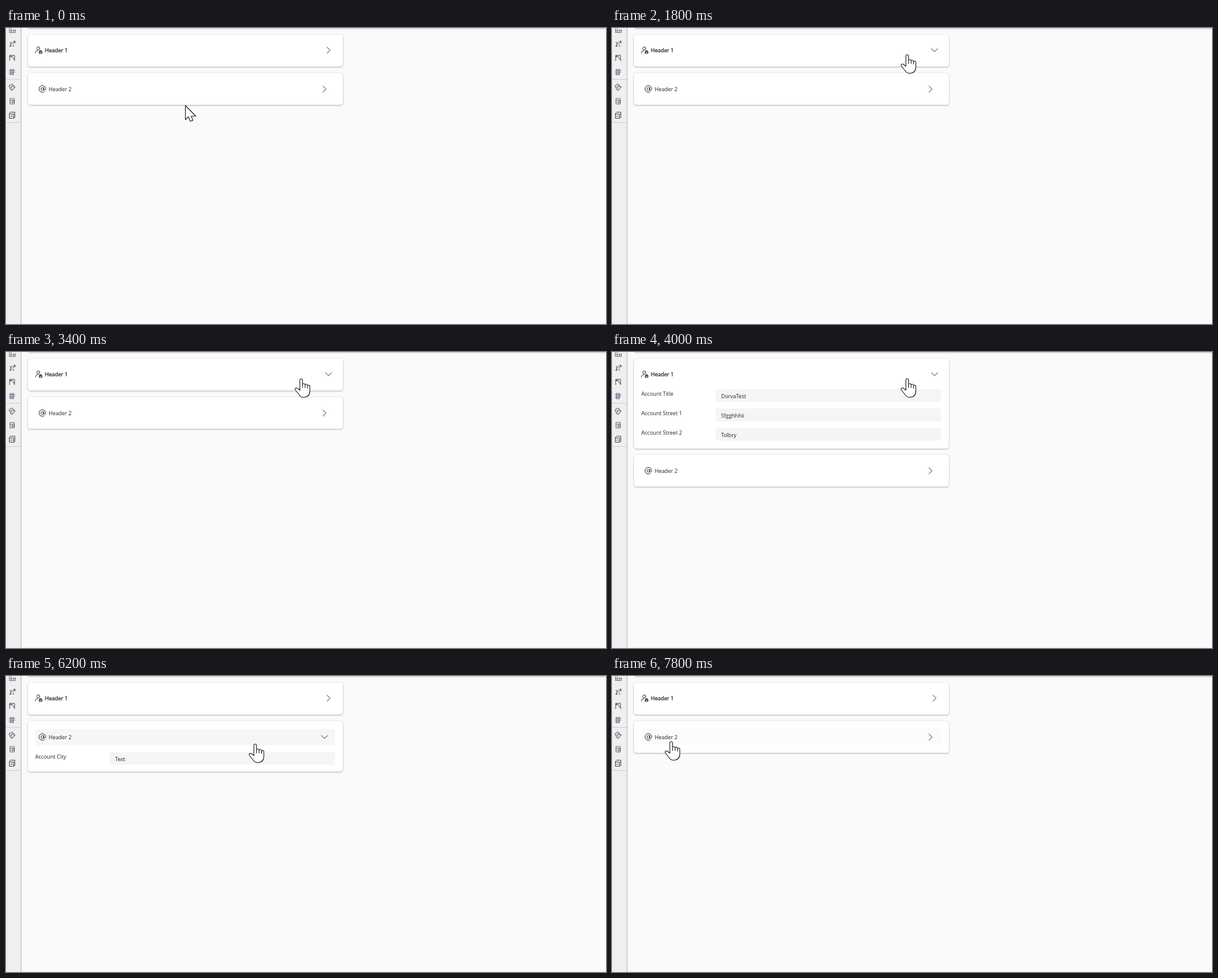
Recreate the animation shown at these times as an HTML page. Size 985x487 px, loop 8 s.

```html
<!DOCTYPE html>
<html lang="en">
<head>
<meta charset="utf-8">
<title>Collapsible cards</title>
<style>
  html, body { margin: 0; width: 100%; height: 100%; overflow: hidden; background: #fafafa; }
  svg { display: block; width: 100vw; height: 100vh; }
  text { font: 8.8px "Open Sans", "Noto Sans", sans-serif; fill: #242424; }
  .head { fill: #111; stroke: #111; stroke-width: .2; }
  .card { fill: #fff; filter: drop-shadow(0 1px 1.2px rgba(0,0,0,.24)) drop-shadow(0 0 .8px rgba(0,0,0,.12)); }
  .line { fill: none; stroke: #2a2a2a; stroke-linecap: round; stroke-linejoin: round; }
  .side { fill: none; stroke: #444; }
  .cursor { fill: #fff; stroke: #1c1c1c; stroke-width: 1.1; stroke-linejoin: round; }
</style>
</head>
<body>
<svg viewBox="0 0 985 487">
  <defs>
    <linearGradient id="top" x2="0" y2="1">
      <stop stop-color="#c4c4c4"/><stop offset="1" stop-color="#fafafa"/>
    </linearGradient>
    <linearGradient id="edge">
      <stop stop-color="#b9b9b9"/><stop offset="1" stop-color="#fafafa"/>
    </linearGradient>
  </defs>
  <rect width="985" height="487" fill="#fafafa"/>
  <rect x="37" width="948" height="3" fill="url(#top)"/>
  <rect y="486" width="985" height="1" fill="#f0f0f0"/>

  <rect width="24" height="487" fill="#efefef"/>
  <rect x="24" width="2.5" height="487" fill="url(#edge)"/>
  <path d="M0 84.5H24M0 155.5H24" stroke="#cfcfcf"/>
  <g class="side">
    <path d="M5.5 0V7.500H15.500V2M5.500 4.500H15M8.500 0V7M12.500 2V7" stroke="#777"/>
    <path d="M6 23L8 25L11 23M8 25V31M8 27L6 31M11 27L15 21M12 22H15V25M12 28V31"/>
    <path d="M6 54V45H14V54M6 47H10L14 53M8 45V48"/>
    <path d="M5 69.500H15M5 72.500H15M5 75.500H13M8 67V78M11.500 67V78" stroke="#557"/>
    <path d="M5 95L10 92L15 97L11 102H8ZM8 97L11 95L13 98M8 97L10 100"/>
    <path d="M6.500 116H13.500V125H6.500ZM6 119H15M8 122H15M11 119V124" stroke="#666"/>
    <path d="M7.500 138.500H14.500V147L13 148.500H5.500V140.500ZM5.500 141.500H12.500V148M7 145H11"/>
  </g>

  <rect id="card1" class="card" x="36" y="11" width="517" rx="4.5"/>
  <g class="line">
    <circle cx="53" cy="33.500" r="2.500" stroke="#25324a"/>
    <path d="M48.500 41C48.500 38 50 37 52.500 37" stroke="#25324a"/>
    <path d="M54.500 41.500V38.500H59V41.500ZM55.500 38V37H58V38M54.500 40H59"/>
  </g>
  <text class="head" x="63.700" y="40">Header 1</text>
  <path id="chev1" class="line"/>
  <g id="body1"></g>

  <g id="group2">
    <rect id="card2" class="card" x="36" y="74" width="517" rx="4.5"/>
    <rect id="hover" x="48" y="87" width="492" height="27" rx="2"/>
    <g class="line">
      <circle cx="59.700" cy="100.400" r="2.300"/>
      <path d="M62 98V101C62 103.600 65.200 103.300 65.200 100.400A5.500 5.500 0 1 0 62.600 105"/>
    </g>
    <text x="70" y="104">Header 2</text>
    <path id="chev2" class="line"/>
    <g id="body2"></g>
  </g>

  <path id="arrow" class="cursor" d="M.5 .5V24L5.500 19L8.500 26.500L13 25L10 18H17.500Z"/>
  <path id="hand" class="cursor" d="M-2 20V3Q-2 1 0 1Q2.300 1 2.300 3V11Q2.300 9 4.400 9Q6.500 9 6.500 11V12Q6.500 10 8.500 10Q10.500 10 10.500 12V13Q11 11.500 12.500 11.500Q14.300 11.500 14.300 14V21Q14.300 31.500 4 31.500Q-1 31.500 -3.500 27L-9.500 19.500Q-10.500 17 -8.500 16.300Q-7 16 -5.500 17ZM2.300 11V16M6.500 12V16M10.500 13V17"/>
</svg>
<script>
  const LOOP = 8000, STEP = 200;
  const $ = id => document.getElementById(id);
  const clamp = v => Math.min(1, Math.max(0, v));
  const smooth = p => p * p * (3 - 2 * p);
  const easeOut = p => 1 - (1 - p) ** 6;

  const field = (label, value, y) => `
    <text x="48" y="${y + 11}">${label}</text>
    <rect x="170" y="${y}" width="370" height="21" rx="1.5" fill="#f5f5f5"/>
    <text x="179" y="${y + 15}">${value}</text>`;

  $('body1').innerHTML = [
    ['Account Title', 'DorvaTest'], ['Account Street 1', 'Sfgghhhii'], ['Account Street 2', 'Tolbry']
  ].map(([label, value], i) => field(label, value, 61 + 32 * i)).join('');
  $('body2').innerHTML = field('Account City', 'Text', 125);

  const home = { x: 294, y: 127 };
  const legs = [
    { from: 200, to: 1200, x: 484.5, y: 43 },
    { from: 4200, to: 5000, x: 415, y: 121 },
    { from: 5000, to: 5600, x: 409, y: 111 },
    { from: 6800, to: 7800, x: 97, y: 107 }
  ];

  const pointer = t => legs.reduce((at, leg) => {
    const p = smooth(clamp((t - leg.from) / (leg.to - leg.from)));
    return { x: at.x + (leg.x - at.x) * p, y: at.y + (leg.y - at.y) * p };
  }, home);

  // Visible share of a panel between click and close
  const reveal = (t, click) => easeOut(clamp((t - click) / 600));
  const within = (t, a, b) => t >= a && t < b;

  const chevron = (x, y, down) => down
    ? `M${x - 5} ${y - 2.5}l5 5l5 -5`
    : `M${x - 2.5} ${y - 5}l5 5l-5 5`;

  function setPanel(n, x, y, down, extra) {
    $('card' + n).setAttribute('height', 52.5 + extra);
    $('body' + n).style.display = extra ? '' : 'none';
    $('chev' + n).setAttribute('d', chevron(x, y, down));
  }

  function draw(time) {
    const t = Math.floor(time % LOOP / STEP) * STEP;
    const again = t >= 3400;
    const down1 = again ? t < 4200 : within(t, 1800, 2800);
    const down2 = within(t, 5800, 6800);
    const extra1 = down1 ? 95.5 * reveal(t, again ? 3400 : 1800) : 0;
    const extra2 = down2 ? 31 * reveal(t, 5800) : 0;

    setPanel(1, 529.5, 36.5, down1, extra1);
    setPanel(2, 522.8, 100.5, down2, extra2);
    $('group2').setAttribute('transform', `translate(0 ${Math.floor(extra1)})`);

    const { x, y } = pointer(t);
    const over = within(y, 87, 125);
    $('hover').setAttribute('fill', down2 ? '#f6f6f6' : over ? '#fbfbfb' : '#fff');

    const link = within(y, 24, 51) || within(y, 87, 116);
    $('hand').style.display = link ? '' : 'none';
    $('arrow').style.display = link ? 'none' : '';
    $(link ? 'hand' : 'arrow').setAttribute('transform', `translate(${x} ${y})`);
  }

  const start = performance.now();
  function tick() {
    draw(performance.now() - start);
    requestAnimationFrame(tick);
  }
  tick();
</script>
</body>
</html>
```
